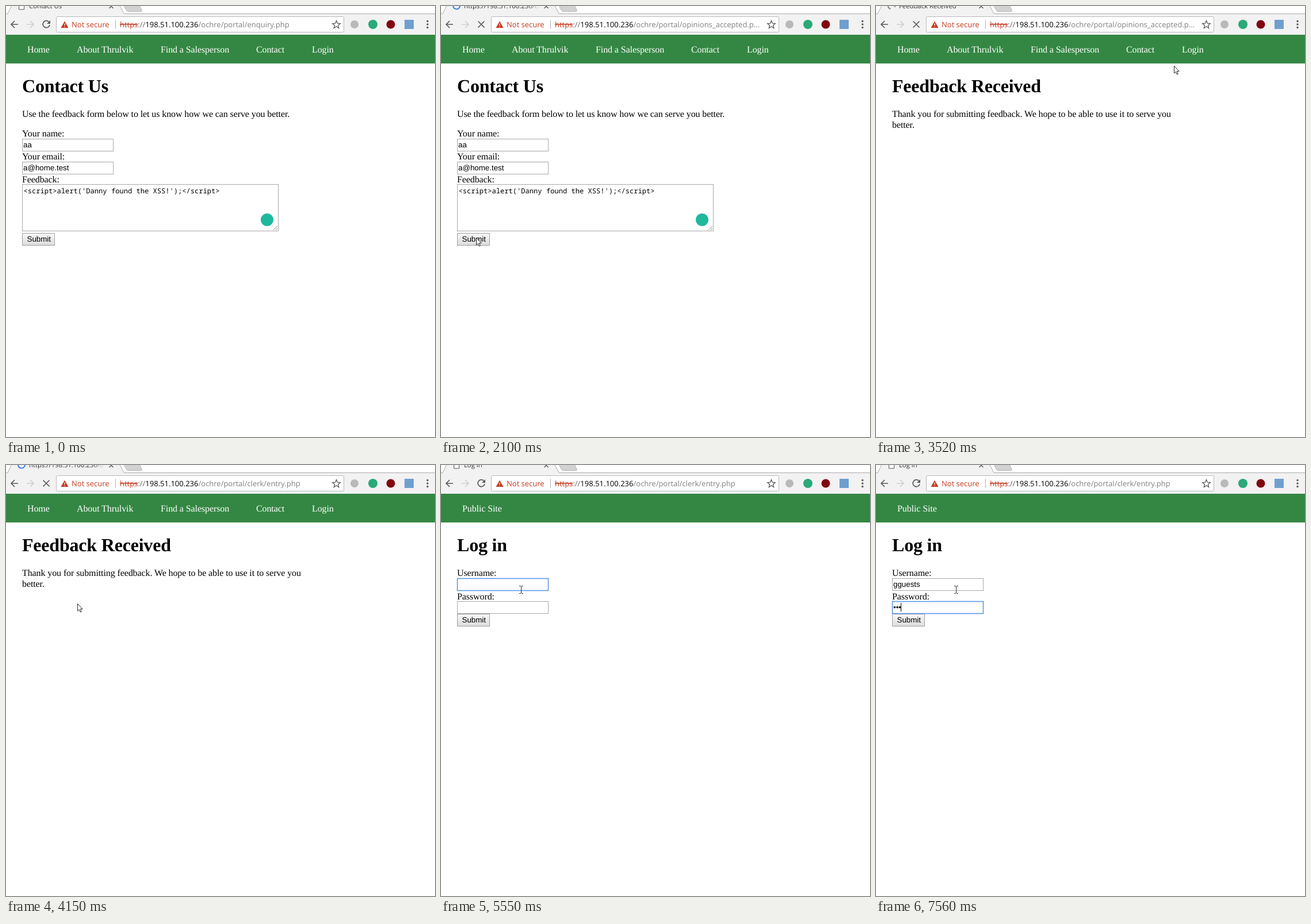
An HTML page that plays this animation: 746x750 px, repeating every 8 s.

```html
<!DOCTYPE html>
<html lang="en">
<head>
<meta charset="utf-8">
<title>Contact form</title>
<style>
  html, body { margin: 0; width: 100%; height: 100%; overflow: hidden; background: #fff; }
  svg { display: block; width: 746px; height: 750px; }
  text { font: 16px "Liberation Serif", serif; letter-spacing: -.1px; text-rendering: geometricPrecision; white-space: pre; }
  .h1 { font-size: 32px; font-weight: bold; letter-spacing: -.2px; }
  .field { font: 13.33px "Liberation Sans", sans-serif; letter-spacing: 0; }
  .code { font: 12.1px "Noto Sans Mono", monospace; letter-spacing: 0; }
  .ui { font: 13px "Open Sans", sans-serif; letter-spacing: 0; }
  .tab { font-size: 11.3px; }
  .nav { fill: #fff; }
  .box { fill: #fff; stroke: #a9a9a9; }
  .focus { fill: none; stroke: #5f97e8; stroke-width: 1.6; }
  .line { fill: none; stroke: #5a5a5a; stroke-width: 1.7; }
</style>
</head>
<body>
<svg viewBox="0 0 746 750">
  <defs>
    <linearGradient id="face" x2="0" y2="1"><stop stop-color="#f8f8f8"/><stop offset="1" stop-color="#dcdcdc"/></linearGradient>
    <linearGradient id="fade" gradientUnits="userSpaceOnUse" x1="150" x2="171"><stop stop-color="#333"/><stop offset="1" stop-color="#333" stop-opacity="0"/></linearGradient>
  </defs>

  <!-- browser chrome -->
  <path fill="#f2f2f2" d="M0 14H3L10 0H198L205 14H746V50H0Z"/>
  <path fill="none" stroke="#aaa" d="M0 13.5H3L9.500 0M198 0L205 13.500H746"/>
  <path fill="#d2d2d2" stroke="#b4b4b4" d="M205 -1L209 7Q210 9.500 213 9.500H234Q237 9.500 236 7L232 -1"/>
  <path id="favicon" fill="#fff" stroke="#555" d="M22.500 -5H31.500V6H22.500Z"/>
  <circle id="spinner" cx="27" cy="-.5" r="6" fill="none" stroke-width="2.2" stroke-dasharray="28.3 9.4"/>
  <text id="title" class="ui tab" x="40" y="4" fill="url(#fade)"></text>
  <path stroke="#555" stroke-width="1.4" d="M179.500 -3L186.500 4M186.500 -3L179.500 4"/>
  <path class="line" d="M21 32H9M15 26L9 32L15 38"/>
  <path class="line" style="stroke:#cfcfcf" d="M36 32H48M42 26L48 32L42 38"/>
  <g id="reload"><path class="line" d="M74.500 27.500A6 6 0 1 0 76 33"/><path fill="#5a5a5a" d="M77 25V31H71Z"/></g>
  <path id="stop" class="line" d="M64.500 26.500L75.500 37.500M75.500 26.500L64.500 37.500"/>
  <rect x="87.500" y="18.500" width="500" height="27" rx="2" fill="#fff" stroke="#b8b8b8"/>
  <path fill="#c5391f" d="M102 26.500L108.500 38H95.500Z"/>
  <path stroke="#fff" stroke-width="1.3" d="M102 30.500V34M102 35.200V36.500"/>
  <text class="ui" x="114" y="37" fill="#c5391f">Not secure</text>
  <path stroke="#b0b0b0" d="M190.500 24V40"/>
  <text class="ui" x="198" y="37"><tspan fill="#c5391f" text-decoration="line-through">https</tspan><tspan fill="#666">://</tspan><tspan>198.51.100.236</tspan><tspan id="path" fill="#808080"></tspan></text>
  <path class="line" style="stroke-width:1.3" d="M574.500 25.500L576.400 30.200L581.300 30.500L577.500 33.700L578.700 38.500L574.500 35.800L570.300 38.500L571.500 33.700L567.700 30.500L572.600 30.200Z"/>
  <circle cx="606" cy="32" r="7" fill="#b9b9b9"/>
  <circle cx="638" cy="32" r="8" fill="#2aa979"/>
  <circle cx="669" cy="32" r="7.500" fill="#800610"/>
  <rect x="693" y="24" width="16" height="16" fill="#6f9fce"/>
  <g fill="#5a5a5a"><circle cx="733" cy="26.500" r="1.700"/><circle cx="733" cy="32" r="1.700"/><circle cx="733" cy="37.500" r="1.700"/></g>

  <!-- web pages -->
  <rect y="50" width="746" height="50" fill="#348743"/>
  <g id="pages"></g>

  <!-- pointers -->
  <path id="arrow" fill="#fff" stroke="#111" stroke-width=".9" d="M.5 .5V13L3.300 10.400L5.300 15L7.300 14.200L5.300 9.600H9.200Z"/>
  <path id="hand" fill="#fff" stroke="#111" stroke-width=".9" d="M-1 1Q0 -.5 1.200 1V6.500Q3 5.500 4 7Q6 6 7 7.600Q9.500 7 9.500 9.500V12Q9 15 7.500 17H.5L-4.500 10.500Q-4.500 8.500 -2.500 9.500L-1 11Z"/>
  <path id="beam" fill="none" stroke="#333" d="M-3 -6.500H-1L.5 -5.500L2 -6.500H4M.5 -5.500V5.500M-3 6.500H-1L.5 5.500L2 6.500H4"/>
</svg>
<script>
const $ = id => document.getElementById(id);
const text = (x, y, s, cls = "", id = "") => `<text x="${x}" y="${y}" class="${cls}" id="${id}">${s}</text>`;
const box = (y, w = 158, h = 21, cls = "box", id = "") =>
  `<rect x="28.500" y="${y}" width="${w}" height="${h}" class="${cls}" id="${id}"/>`;
const button = (y, id) => box(y, 56, 21, "", id + '" fill="url(#face)" stroke="#a0a0a0') + text(36.5, y + 14.5, "Submit", "field");
const heading = s => text(28, 150, s, "h1");
const menu = [[37, "Home"], [123, "About Thrulvik"], [269, "Find a Salesperson"], [435, "Contact"], [532, "Login"]]
  .map(([x, s]) => text(x, 81, s, "nav")).join("");

$("pages").innerHTML = `
  <g id="menu">${menu}</g>
  <g id="contact">${heading("Contact Us")
    + text(28, 193, "Use the feedback form below to let us know how we can serve you better.")
    + text(28, 227, "Your name:") + box(231.5) + text(30, 246, "aa", "field")
    + text(28, 267, "Your email:") + box(271.5) + text(30, 285.5, "a@home.test", "field")
    + text(28, 307, "Feedback:") + box(310.5, 445, 81)
    + text(30.5, 326, "&lt;script&gt;alert('Danny found the XSS!');&lt;/script&gt;", "code")
    + button(395.5, "send")}
    <circle cx="454" cy="372" r="11" fill="#1fb89d"/>
    <path stroke="#888" d="M465 390L472 383M469 390L472 387"/></g>
  <g id="thanks">${heading("Feedback Received")
    + text(28, 193, "Thank you for submitting feedback. We hope to be able to use it to serve you")
    + text(28, 211.5, "better.")}</g>
  <g id="login">${text(37, 81, "Public Site", "nav") + heading("Log in")
    + text(28, 193, "Username:") + box(197.5) + text(30, 212, "", "field", "user")
    + text(28, 233.5, "Password:") + box(237.5) + text(30, 252, "", "field", "pass")
    + button(259.5, "enter")
    + box(197.5, 158, 21, "focus", "userFocus") + box(237.5, 158, 21, "focus", "passFocus")}
    <path id="caret" stroke="#000" d="M.5 0V15"/></g>`;

// pointer path: time, x, y
const moves = [
  [140, 552, 727], [280, 480, 650], [420, 330, 545], [560, 190, 465], [700, 95, 412], [840, 64, 397], [910, 61, 403],
  [2450, 61, 403], [2660, 285, 235], [2800, 481, 117], [3010, 540, 92], [3220, 562, 74],
  [3430, 562, 74], [3640, 430, 165], [3920, 180, 272], [4130, 124, 241]];
const beams = [[4300, 129, 243], [4530, 133, 236], [4630, 138, 229], [4940, 139, 217]];
const userKeys = [5630, 5780, 5860, 6010, 6080, 6150, 6320];
const passKeys = [7100, 7400, 7560];

const show = (id, on) => $(id).style.display = on ? "" : "none";
const place = (id, x, y) => $(id).setAttribute("transform", `translate(${x} ${y})`);
const typed = (keys, t) => keys.filter(k => t >= k).length;

function pointerAt(t) {
  if (t >= 4300) return beams.filter(b => t >= b[0]).pop().slice(1);
  const s = t - t % 70;  // the screen is sampled every 70 ms
  const i = moves.findIndex(m => m[0] > s);
  if (i < 0) return moves[moves.length - 1].slice(1);
  const a = moves[Math.max(i - 1, 0)], b = moves[i];
  const u = Math.max(0, (s - a[0]) / (b[0] - a[0] || 1));
  return [1, 2].map(k => Math.round(a[k] + (b[k] - a[k]) * u));
}

function render(t) {
  const within = (a, b) => t >= a && t < b;

  const loading = within(990, 2490) || within(3460, 4300);
  const committed = within(1460, 2490) || within(3700, 4300);
  show("favicon", !loading);
  show("reload", !loading);
  show("spinner", loading);
  show("stop", loading);
  const spin = t < 1460 ? 1460 : within(2170, 2490) ? 2170 : t;
  $("spinner").setAttribute("stroke", committed ? "#4a80e4" : "#8a8a8a");
  $("spinner").setAttribute("transform", `rotate(${-45 + (spin - 2100) * .36} 27 -.5)`);
  $("title").textContent = committed ? "https://198.51.100.236/oc"
    : t < 1460 ? "Contact Us" : t < 4300 ? "Feedback Received" : "Log in";
  $("path").textContent = "/ochre/portal/" +
    (t < 1460 ? "enquiry.php" : t < 3700 ? "opinions_accepted.p..." : "clerk/entry.php");

  show("menu", t < 4220);
  show("contact", t < 2170);
  show("thanks", within(2170, 4220));
  show("login", t >= 4220);
  $("send").setAttribute("fill", within(990, 1070) ? "#dcdcdc" : "url(#face)");

  $("user").textContent = "gguests".slice(0, typed(userKeys, t));
  $("pass").textContent = "•".repeat(typed(passKeys, t));
  const onPass = t >= 6470;
  show("userFocus", within(5000, 6470));
  show("passFocus", onPass);
  show("caret", t >= 5000 && !within(5550, 5630) && !within(7020, 7100));
  const field = $(onPass ? "pass" : "user");
  const width = field.textContent ? field.getComputedTextLength() : 0;
  place("caret", Math.floor(30 + width - .3), onPass ? 240 : 200);

  const [x, y] = pointerAt(t);
  const kind = t < 140 ? "" : t >= 4300 ? "beam" : x > 540 && y < 88 ? "hand" : "arrow";
  for (const id of ["arrow", "hand", "beam"]) show(id, id === kind);
  if (kind) place(kind, x, y);
}

function tick() {
  render(performance.now() % 8000);
  requestAnimationFrame(tick);
}
tick();
</script>
</body>
</html>
```
